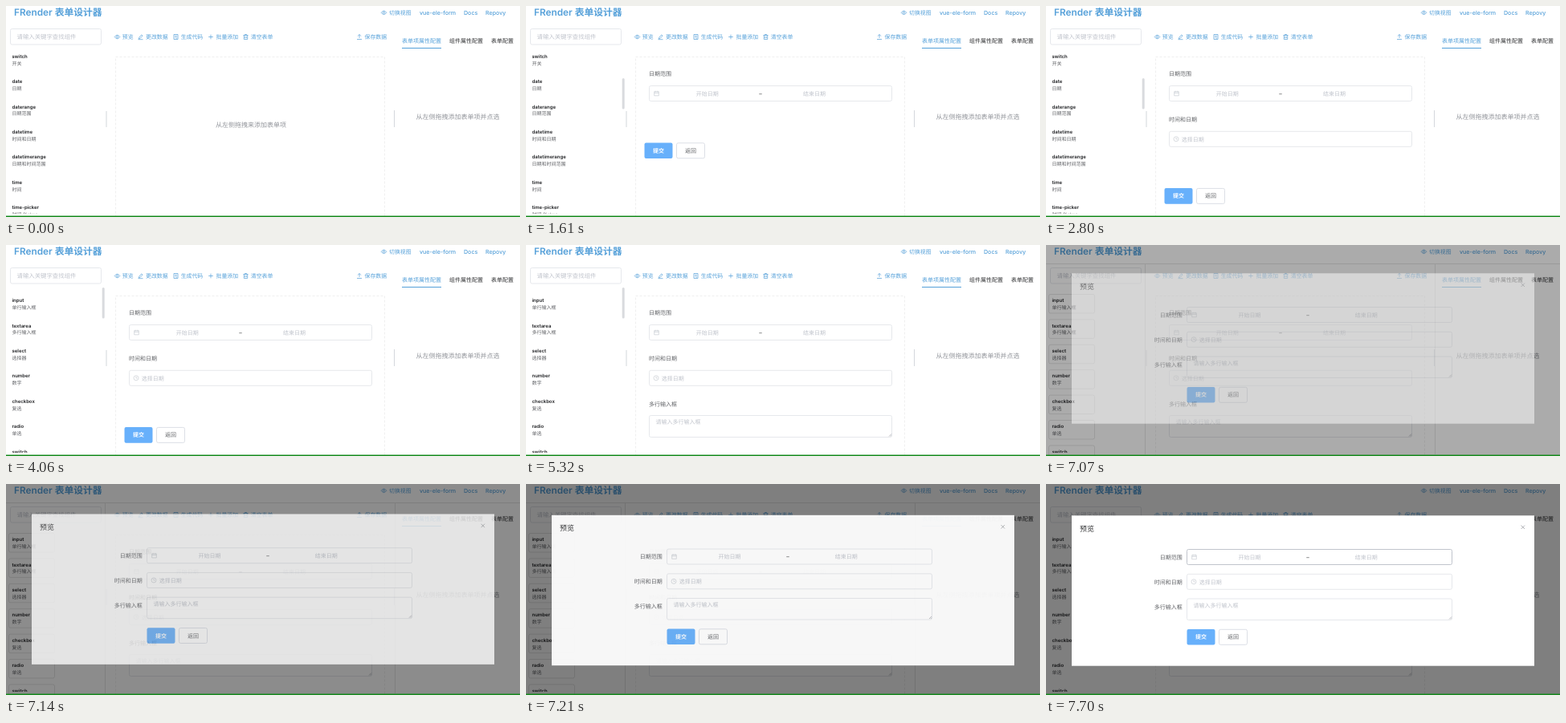
Animation of 640 by 263 pixels, one loop 8000 ms. Source, as an HTML page:

```html
<!DOCTYPE html>
<html lang="zh-CN">
<head>
<meta charset="utf-8">
<title>表单设计器</title>
<style>
html, body { margin: 0; width: 100%; height: 100%; overflow: hidden; background: #fff; }
svg { display: block; width: 100%; height: 100%; }
text { font-family: Inter, "Noto Sans CJK SC", "Noto Sans CJK", sans-serif; text-rendering: geometricPrecision; white-space: pre; }
</style>
</head>
<body>
<svg id="stage" viewBox="0 0 640 263"></svg>
<script>
const BLUE = '#55a0d9', DARK = '#303133', BODY = '#606266', HINT = '#c0c4cc', LINE = '#e6e8ec';
const LOOP = 8000, PITCH = 31.4, SCROLL_MAX = 194.8, THUMB_TRAVEL = 37;

// Text is placed by its vertical centre.
const text = (x, y, size, fill, label, weight = 400, anchor = 'start') =>
  `<text x="${x}" y="${y + size * 0.37}" font-size="${size}" fill="${fill}" font-weight="${weight}" text-anchor="${anchor}">${label}</text>`;
const rect = (x, y, w, h, attrs) => `<rect x="${x}" y="${y}" width="${w}" height="${h}" ${attrs}/>`;
const box = (x, y, w, h, attrs = '') => rect(x, y, w, h, `rx="2" fill="none" stroke="${LINE}" ${attrs}`);
const group = (id, body, attrs = '') => `<g id="${id}" ${attrs}>${body}</g>`;

const iconPaths = {
  eye: 'M-3.3 0Q0-4.6 3.3 0Q0 4.6-3.3 0ZM-1.1 0a1.1 1.1 0 1 0 2.2 0a1.1 1.1 0 1 0-2.2 0',
  pen: 'M-2 1.2L1.2-2.6L2.6-1.4L-.6 2L-2.3 2.3ZM-3 3.2H3',
  doc: 'M-2.5-3H2.5V3H-2.5ZM-1.2-1.2H1.2M-1.2 .4H1.2M.2 1.8H1.2',
  plus: 'M-2.8 0H2.8M0-2.8V2.8',
  trash: 'M-3-2H3M-1-2V-3H1V-2M-2.2-2V3H2.2V-2M-.8-.5V1.6M.8-.5V1.6',
  upload: 'M-3 3H3M0 1.4V-3M-2-1L0-3L2-1',
  calendar: 'M-2.8-2.3H2.8V2.8H-2.8ZM-2.8-.6H2.8M-1.4-3.2V-1.6M1.4-3.2V-1.6',
  clock: 'M-3 0a3 3 0 1 0 6 0a3 3 0 1 0-6 0M0-1.8V.2H1.5',
  close: 'M-2.2-2.2L2.2 2.2M2.2-2.2L-2.2 2.2',
  grip: 'M-3 0L0-3M-1.2 0L0-1.2'
};
const icon = (name, x, y, color = BLUE, width = 0.7) =>
  `<path d="${iconPaths[name]}" transform="translate(${x} ${y})" fill="none" stroke="${color}" stroke-width="${width}"/>`;

const dateRange = (x, y, w, startX, dashX, endX, id) =>
  box(x, y, w, 19, `id="${id}"`) + icon('calendar', x + 9, y + 9.5, HINT, 0.6) +
  text(startX, y + 9.8, 7, HINT, '开始日期') + text(dashX, y + 9.5, 7, DARK, '–', 400, 'middle') +
  text(endX, y + 9.8, 7, HINT, '结束日期');
const dateTime = (x, y, w) =>
  box(x, y, w, 19) + icon('clock', x + 8.5, y + 9.5, HINT, 0.6) + text(x + 15.3, y + 9.8, 7, HINT, '选择日期');
const textArea = (x, y, w, h) =>
  box(x, y, w, h) + text(x + 8, y + 8.3, 7, HINT, '请输入多行输入框') + icon('grip', x + w - 0.5, y + h - 1, '#909399', 0.6);
const buttons = (x, y) =>
  rect(x, y, 35, 19.6, 'rx="2" fill="#67b0fb"') + text(x + 17.5, y + 9.8, 7, '#fff', '提交', 600, 'middle') +
  box(x + 40, y + 0.3, 35, 19, 'style="stroke:#dcdfe6"') + text(x + 57.5, y + 9.8, 7, BODY, '返回', 500, 'middle');

const components = [
  ['input', '单行输入框'], ['textarea', '多行输入框'], ['select', '选择器'], ['number', '数字'],
  ['checkbox', '复选'], ['radio', '单选'], ['switch', '开关'], ['date', '日期'], ['daterange', '日期范围'],
  ['datetime', '时间和日期'], ['datetimerange', '日期和时间范围'], ['time', '时间'], ['time-picker', '时间 Picker']
];
const tools = [
  ['pen', 167.5, 174, '更改数据'], ['doc', 211.5, 217.7, '生成代码'], ['plus', 255, 261.5, '批量添加'],
  ['trash', 298.5, 304.8, '清空表单'], ['upload', 440, 446.5, '保存数据']
];

const header =
  text(10, 8, 11.8, BLUE, 'FRender 表单设计器', 600) + icon('eye', 470.5, 8.3) +
  text(477, 8.3, 6.9, BLUE, '切换视图', 500) + text(515, 8, 7.1, BLUE, 'vue-ele-form', 500) +
  text(570, 8, 7.1, BLUE, 'Docs', 500) + text(597, 8, 7.1, BLUE, 'Repovy', 500);

const sidebar =
  box(5.5, 28.5, 113, 19.5) + text(13.5, 38.3, 7.4, HINT, '请输入关键字查找组件') +
  `<clipPath id="listClip">${rect(0, 53, 124, 206, '')}</clipPath>` +
  group('listView', group('list', components.map(([name, label], i) =>
    text(7.5, 69 + i * PITCH, 6, '#1f2023', name, 600) + text(7.5, 77.8 + i * PITCH, 6, BODY, label)).join('')),
    'clip-path="url(#listClip)"') +
  rect(119.7, 53, 3, 38.5, 'id="thumb" rx="1.5" fill="#d9dbde"');

const toolbar =
  group('previewTool', icon('eye', 138.5, 38.5) + text(144.8, 38.5, 6.9, BLUE, '预览', 500)) +
  tools.map(([name, iconX, x, label]) => icon(name, iconX, 38.5) + text(x, 38.5, 6.9, BLUE, label, 500)).join('');

const rightPanel =
  text(493, 43, 7, BLUE, '表单项属性配置', 500) + text(552, 43, 7, DARK, '组件属性配置', 500) +
  text(604, 43, 7, DARK, '表单配置', 500) + rect(493, 52, 49, 1, `fill="${BLUE}"`) +
  text(510.5, 138.5, 8, '#909399', '从左侧拖拽添加表单项并点选');

const canvasArea =
  rect(136.5, 63.5, 335, 210, 'fill="none" stroke="#efefef" stroke-dasharray="3 2"') +
  rect(124.5, 131, 1, 20, 'fill="#d4d7dc"') + rect(483, 130, 1, 21, 'fill="#d4d7dc"') +
  group('empty', text(261, 148.5, 8, '#909399', '从左侧拖拽来添加表单项')) +
  group('field0', text(153, 84.5, 7, BODY, '日期范围') + dateRange(153.5, 99.5, 302, 211.8, 292, 345, 'formRange')) +
  group('field1', text(153, 141, 7, BODY, '时间和日期') + dateTime(153.5, 156.3, 302)) +
  group('field2', text(153, 198, 7, BODY, '多行输入框') + textArea(153.5, 212.5, 302, 27)) +
  group('formButtons', buttons(147.5, 170.5));

const outlines = group('outlines',
  components.slice(0, 7).map((_, i) => rect(3.5, 61.5 + i * PITCH, 57, 23.5, 'rx="2"')).join('') +
  '<path d="M0 23.5H640M123.5 24V261M484.5 24V261"/>', 'fill="none" stroke="#000" stroke-opacity=".1"');

const dialog = group('dialog',
  rect(32, 39.3, 576, 187.4, 'fill="#fff"') + text(42, 55.5, 9, DARK, '预览') + icon('close', 593.8, 53.8, '#909399') +
  ['日期范围', '时间和日期', '多行输入框'].map((label, i) => text(169.8, 91.2 + i * 31, 7, BODY, label, 400, 'end')).join('') +
  dateRange(175.5, 81.5, 330, 239.6, 326, 384.8, 'dialogRange') + dateTime(175.5, 112.3, 330) +
  textArea(175.5, 143, 330, 26.5) + buttons(175.5, 181));

document.getElementById('stage').innerHTML =
  header + sidebar + toolbar + rightPanel + canvasArea + outlines +
  rect(0, 0, 640, 263, 'id="shade" fill="#000"') + dialog + rect(0, 261.5, 640, 1.5, 'fill="#158a1c"');

const byId = id => document.getElementById(id);
const show = (id, visible) => byId(id).setAttribute('display', visible ? 'inline' : 'none');
const set = (id, name, value) => byId(id).setAttribute(name, value);
// Returns the value of the last [time, value] step reached.
const hold = (t, initial, steps) => steps.reduce((value, [at, next]) => t >= at ? next : value, initial);

function render(t) {
  const scroll = hold(t, SCROLL_MAX, [[3850, 95], [3920, 16], [4060, 0]]);
  set('list', 'transform', `translate(0 ${-scroll})`);
  set('thumb', 'y', 53 + scroll / SCROLL_MAX * THUMB_TRAVEL);
  set('thumb', 'opacity', hold(t, 0, [[840, 0.35], [910, 0.7], [980, 1], [6090, 0.65], [6160, 0.3], [6230, 0]]));

  const fields = hold(t, 0, [[1610, 1], [2800, 2], [5320, 3]]);
  show('empty', fields === 0);
  for (let i = 0; i < 3; i++) show('field' + i, fields > i);
  show('formButtons', fields > 0);
  set('formButtons', 'transform', `translate(0 ${(fields - 1) * 56.6})`);
  set('previewTool', 'opacity', t >= 6930 ? 0.85 : 1);

  const opening = hold(t, 0, [[7070, 0.5], [7140, 0.77], [7210, 0.94], [7280, 1]]);
  show('outlines', opening > 0 && opening < 1);
  set('shade', 'opacity', hold(t, 0, [[7070, 0.33], [7140, 0.45], [7210, 0.5]]));
  show('dialog', opening > 0);
  set('dialog', 'opacity', opening);
  set('dialog', 'transform', `translate(0 ${-8 * (1 - opening)})`);
  set('dialogRange', 'stroke', t >= 7700 ? HINT : LINE);
}

const start = performance.now();
function tick() {
  render((performance.now() - start) % LOOP);
  requestAnimationFrame(tick);
}
tick();
</script>
</body>
</html>
```
